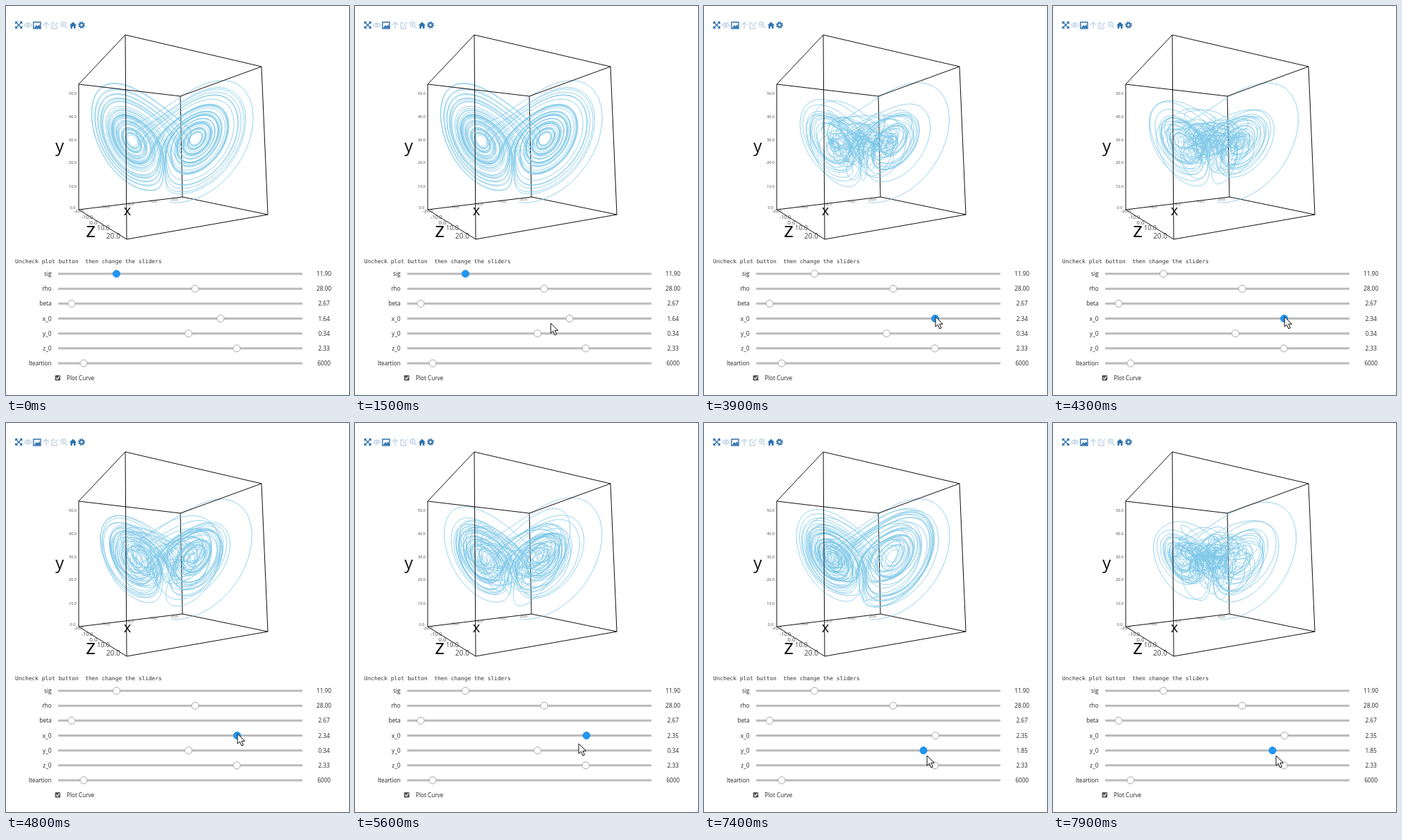
An HTML page for the animation above (8000 ms loop, 486 px wide and 552 px high).

```html
<!DOCTYPE html>
<html lang="en">
<head>
<meta charset="utf-8">
<title>Lorenz attractor with sliders</title>
<style>
html, body { margin: 0; width: 100%; height: 100%; overflow: hidden; background: #fff; }
svg { display: block; font-family: "Open Sans", sans-serif; }
.edge { fill: none; stroke: #111; stroke-width: 1; }
#curve { fill: none; stroke: #7ec8e8; stroke-width: .8; stroke-linejoin: round; }
.mono { font: 7.85px "DejaVu Sans Mono", monospace; white-space: pre; }
</style>
</head>
<body>
<svg id="stage" width="486" height="552" viewBox="0 0 486 552">
  <g id="icons" fill="none" stroke="#2f72ae" stroke-width="1.4">
    <path d="M14 23l8 8M22 23l-8 8"/>
    <path fill="#2f72ae" stroke="none" d="M13 22h4l-4 4zM23 22v4l-4-4zM13 32v-4l4 4zM23 32h-4l4-4z"/>
    <g stroke="#c3d5e6">
      <path d="M26 27q5-6 10 0q-5 6-10 0z"/><circle cx="31" cy="27" r="1.2"/>
      <path d="M57 32v-9M53 27l4-4 4 4"/>
      <path d="M72 28v4h-7v-8h4M68 29l6-6"/>
      <circle cx="81.500" cy="26" r="3.300"/><path d="M84 28.500l3 3M80 26h3M81.500 24.500v3"/>
    </g>
    <path d="M39 23h10v9h-10z"/>
    <path fill="#2f72ae" stroke="none" d="M40 31l3-4 2 2 2-3 2 5zM90 27.500l5-5 5 5h-1.500v4.500h-2.500v-3h-2v3h-2.500v-4.500z"/>
    <circle cx="107" cy="27" r="2.700" stroke-width="2"/>
    <circle cx="107" cy="27" r="4.300" stroke-dasharray="1.800 1.580"/>
  </g>
  <path class="edge" d="M103 289L250 271L371 296M250 271L247 128"/>
  <path id="curve"/>
  <path class="edge" d="M169 41L362 86L247 128L103 111ZM103 111V289L171 331L371 296L362 86M169 41L171 331"/>
  <g id="ticks" fill="#444" text-anchor="middle"></g>
  <g fill="#111" text-anchor="middle">
    <text x="76" y="207" font-size="24">y</text>
    <text x="172" y="297" font-size="20">x</text>
    <text x="120" y="328" font-size="30">z</text>
  </g>
  <text class="mono" x="13" y="365" fill="#333" xml:space="preserve">Uncheck plot button  then change the sliders</text>
  <g id="sliders" font-size="8.200" fill="#222"></g>
  <rect x="69.500" y="524" width="7.500" height="7.500" rx="1.200" fill="#555"/>
  <path d="M71 527.700l1.800 1.900 3-3.900" fill="none" stroke="#fff" stroke-width="1.200"/>
  <text x="86" y="531" font-size="8.200" fill="#222">Plot Curve</text>
  <path id="cursor" d="M0 0V14.200l3.300-3 2.500 5.800 2.500-1.100-2.500-5.600h4.500z" fill="#fff" stroke="#111"/>
</svg>
<script>
const LOOP = 8000, STEP = 100, N = 6000, DT = 0.01;
const $ = id => document.getElementById(id);

// Tick labels: text, centre x, centre y, size
const ticks = [286, 256, 222, 190, 157, 124.5].map((y, i) => [i * 10 + '.0', 94.5, y, 5.5]);
ticks.push(
  ['-20.0', 103, 291, 6], ['-10.0', 115, 299, 7], ['0.0', 124, 307, 8],
  ['10.0', 138, 315, 9], ['20.0', 152, 326, 10],
  ['-10.0', 141, 285, 5.2], ['0.0', 177, 281, 5.2], ['10.0', 209, 277, 5], ['20.0', 239, 274, 5]);
$('ticks').innerHTML = ticks.map(([s, x, y, size]) =>
  `<text x="${x}" y="${y + size * .36}" font-size="${size}">${s}</text>`).join('');

// Sliders: label, handle x, value
const sliders = [
  ['sig', 156.5, '11.90'], ['rho', 268, '28.00'], ['beta', 93, '2.67'], ['x_0', 304, '1.64'],
  ['y_0', 258.5, '0.34'], ['z_0', 327, '2.33'], ['Iteartion', 110, '6000']];
$('sliders').innerHTML = sliders.map(([name, x, value], i) => {
  const y = 380 + i * 21.17;
  return `<text x="64.500" y="${y + 3}" text-anchor="end">${name}</text>
    <path d="M74 ${y}H420" stroke="#bbb" stroke-width="3"/>
    <circle cx="${x}" cy="${y}" r="5" fill="#fff" stroke="#aaa"/>
    <text class="value" x="450.500" y="${y + 3}" text-anchor="middle">${value}</text>`;
}).join('');
const knobs = document.querySelectorAll('#sliders circle');
const values = document.querySelectorAll('#sliders .value');

function setSlider(i, x, value, active) {
  knobs[i].setAttribute('cx', x);
  knobs[i].setAttribute('fill', active ? '#2196f3' : '#fff');
  knobs[i].setAttribute('stroke', active ? '#1e88e5' : '#aaa');
  values[i].textContent = value;
}

function lorenz(x, y, z) {
  const pts = [[x, y, z]];
  for (let i = 0; i < N; i++) {
    const dx = 11.9 * (y - x), dy = 28 * x - y - x * z, dz = x * y - 2.67 * z;
    x += dx * DT; y += dy * DT; z += dz * DT;
    pts.push([x, y, z]);
  }
  return pts;
}

// Perspective view of the box
function project(x, y, z) {
  const u = .5 + x / 44.7, v = .5 + y / 60.6, t = .0295 + .0181 * z;
  const w = 1 + .24 * u - .395 * v + .024 * t;
  return ((103 + 208 * u + 1.5 * v + 2.5 * t) / w).toFixed(1) + ' ' +
    ((289 + 48 * u - 87.7 * v - 175.5 * t) / w).toFixed(1);
}

const curves = [[1.64, .34], [2.34, .34], [2.35, .34], [2.35, 1.85]].map(([x, y]) => lorenz(x, y, 2.33));
const ramp = (t, a, b) => Math.min(1, Math.max(0, (t - a) / (b - a)));
const mix = (a, b, k) => a + (b - a) * k;

// Morph between successive curves: start and end time
const morphs = [[3100, 5200], [5450, 6300], [7300, 8500]];
let lastKey = '';
function drawCurve(t) {
  let i = 2;
  while (i > 0 && t < morphs[i][0]) i--;
  const k = ramp(t, ...morphs[i]), key = i + k;
  const id = i + ':' + k;
  if (id === lastKey) return;
  lastKey = id;
  const a = curves[i], b = curves[i + 1];
  $('curve').setAttribute('d', 'M' + a.map((p, j) =>
    project(...p.map((c, n) => mix(c, b[j][n], k)))).join('L'));
}

// Pointer path: time, x, y
const path = [
  [600, 247, 470], [1000, 250, 458], [1400, 257, 443], [1700, 318, 464], [1900, 258, 443],
  [2200, 301, 442], [2600, 304, 441], [2900, 328, 441], [5400, 328, 441], [5600, 317, 455],
  [6000, 270, 468], [6300, 262, 463], [6400, 262, 463], [7000, 312, 463], [7200, 316, 472], [8000, 316, 472]];
function drawCursor(t) {
  $('cursor').setAttribute('visibility', t < 600 ? 'hidden' : 'visible');
  const i = Math.max(1, path.findIndex(p => p[0] > t));
  const [a, b] = [path[i - 1], path[i]], k = ramp(t, a[0], b[0]);
  $('cursor').setAttribute('transform', `translate(${mix(a[1], b[1], k)} ${mix(a[2], b[2], k)})`);
}

function draw(t) {
  drawCurve(t);
  drawCursor(t);
  const kx = ramp(t, 2600, 2900), ky = ramp(t, 6400, 7000), late = t >= 5000;
  setSlider(0, 156.5, '11.90', t < 2600);
  setSlider(3, late ? 328 : mix(304, 327.5, kx), late ? '2.35' : mix(1.64, 2.34, kx).toFixed(2), t >= 2600 && t < 6500);
  setSlider(4, mix(258.5, 311, ky), mix(.34, 1.85, ky).toFixed(2), t >= 6300);
}

const start = performance.now();
let shown = -1;
function tick() {
  const t = Math.floor((performance.now() - start) % LOOP / STEP) * STEP;
  if (t !== shown) draw(shown = t);
  requestAnimationFrame(tick);
}
tick();
</script>
</body>
</html>
```
